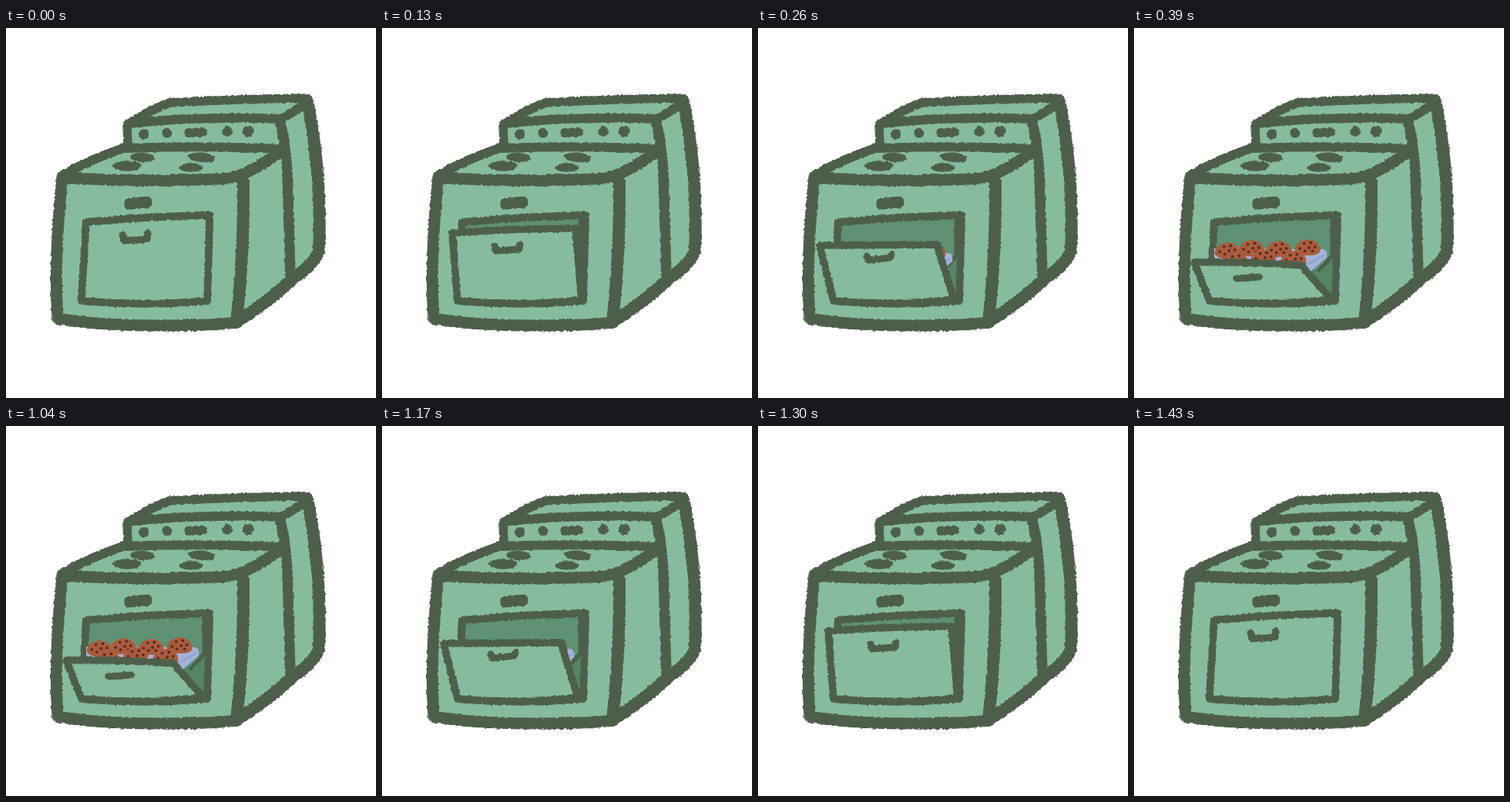
Write an HTML page that moves like this. It is 480 px wide and 480 px high and loops after 1.56 s.

```html
<!DOCTYPE html>
<html>
<head>
<meta charset="utf-8">
<style>
html, body { margin: 0; width: 100%; height: 100%; overflow: hidden; background: #fff; }
svg { display: block; width: 100vw; height: 100vh; }
.line { fill: none; stroke: #4d5f4a; stroke-linecap: round; stroke-linejoin: round; }
.dark { fill: #4d5f4a; }
.skin { fill: #87bba0; }
</style>
</head>
<body>
<svg viewBox="0 0 480 480">
  <filter id="rough" filterUnits="userSpaceOnUse" x="0" y="0" width="480" height="480" color-interpolation-filters="sRGB">
    <feTurbulence type="fractalNoise" baseFrequency=".25" numOctaves="2" seed="4"/>
    <feDisplacementMap in="SourceGraphic" scale="3.5" xChannelSelector="R" yChannelSelector="G"/>
  </filter>
  <defs>
    <g id="cookie">
      <path fill="#ab5c3d" d="M-15 4C-16-4-8-10 1-10S17-2 15 5Q10 10 1 9Q-9 11-15 4Z"/>
      <g id="chips" fill="#5a2d20"></g>
    </g>
  </defs>

  <g filter="url(#rough)">
    <path class="skin" d="M72 194L152 156L157 124L212 96L392 90Q405 140 406 190L408 285Q406 301 370 329L298 384Q180 390 66 378Z"/>
    <g class="line" stroke-width="15">
      <path d="M73 193Q62 300 67 376"/>
      <path d="M67 377Q120 386 200 386Q270 386 298 382"/>
      <path d="M308 200Q309 290 299 382" stroke-width="16"/>
      <path d="M299 381Q340 356 370 327Q404 303 406 287Q410 190 391 95" stroke-width="16"/>
      <path d="M74 194Q190 201 290 195Q315 190 357 160"/>
      <path d="M73 191Q110 170 152 156Q250 152 356 157" stroke-width="12"/>
      <path d="M158 150L157 126Q183 108 212 97Q300 92 391 91" stroke-width="11.5"/>
      <path d="M159 124Q250 114 356 118Q375 108 390 97" stroke-width="12"/>
      <path d="M355 120Q365 155 366 220L369 327" stroke-width="13.5"/>
    </g>
    <g class="dark">
      <circle cx="179" cy="138" r="6.7"/><circle cx="209" cy="136" r="6.5"/>
      <circle cx="287" cy="134" r="6.7"/><circle cx="314" cy="134" r="7.2"/>
      <rect x="231.500" y="129.500" width="29" height="12" rx="5" transform="rotate(-3 246 135)"/>
      <ellipse cx="177" cy="168" rx="15.500" ry="6.200" transform="rotate(4 177 168)"/>
      <ellipse cx="254" cy="168" rx="17.500" ry="6.500" transform="rotate(4 254 168)"/>
      <ellipse cx="157" cy="179" rx="18.500" ry="6.700"/>
      <ellipse cx="240" cy="181" rx="15.500" ry="5.700"/>
      <rect x="153.500" y="219.500" width="36" height="15" rx="6" transform="rotate(-5 171 227)"/>
    </g>
    <path fill="#5f9175" d="M104 252L265 243L262 354L97 354Z"/>
    <path fill="#548566" d="M258 294L240 313L200 312L260 352Z"/>
    <path class="line" stroke-width="5" d="M240 314L257 296V248"/>
    <path class="line" stroke-width="10" d="M104 252Q190 244 264 243L261 354Q180 361 98 354Z"/>
  </g>

  <g id="load">
    <path id="tray" fill="#a4b2db"/>
    <path id="rim" fill="none" stroke="#93a3d2" stroke-width="3" stroke-linecap="round"/>
    <g id="cookies"></g>
  </g>

  <g filter="url(#rough)">
    <path id="door" class="line" style="fill:#87bba0" stroke-width="9.500"/>
    <path id="ledge" class="line" stroke-width="8"/>
    <path id="handle" class="line" stroke-width="9"/>
  </g>
</svg>
<script>
const $ = id => document.getElementById(id);
const base = "Q180 361 98 354Z";

// door poses, from shut to fully open
const doors = [
  { door: "M104 252Q190 244 264 243L261 354" + base, handle: "M151 268L153 276L183 274L184 266" },
  { door: "M91 266Q170 260 251 260L259 353" + base, handle: "M146 283L148 289L178 287L179 281" },
  { door: "M80 282L232 281L254 352" + base, handle: "M141 296L143 301L171 298L173 294" },
  { door: "M78 304Q150 303 217 308L256 352" + base, handle: "M133 325L163 323" },
  { door: "M76 329Q130 324 192 327L255 354" + base, handle: "M125 342L151 342", ledge: "M84 319Q160 322 243 319" }
];

const loads = {
  inside: {
    tray: "M104 286L246 287Q252 290 250 298L230 315L104 309Z",
    rim: "M226 306L246 295",
    cookies: [[121, 289], [152, 286], [188, 287], [225, 285], [132, 302], [168, 298], [207, 300]],
    scale: 1.08
  },
  out: {
    tray: "M102 278L245 278Q252 280 251 285L245 313Q243 318 235 317L96 314Q90 313 91 307Z",
    rim: "M99 306L112 307M145 308L190 308M224 304L237 303",
    cookies: [[111, 284], [146, 285], [186, 283], [224, 283], [128, 295], [168, 297], [207, 297]],
    scale: 1
  }
};

// start time, door pose, load, load offset
const steps = [
  [0, 0, "inside", 0, 4],
  [130, 1, "inside", 0, 4],
  [260, 2, "inside", 2, 5],
  [390, 3, "inside", 0, 0],
  [520, 4, "out", 0, 0],
  [1040, 3, "inside", 0, 0],
  [1170, 2, "inside", -1, 2],
  [1300, 1, "inside", -1, 4],
  [1430, 0, "inside", 0, 4]
];

$("chips").innerHTML = [[-9, 1], [-4, -5], [4, -6], [9, -1], [2, 0], [-3, 4], [6, 4]]
  .map(([x, y]) => `<circle cx="${x}" cy="${y}" r="1.8"/>`).join("");

function show([, pose, place, dx, dy]) {
  const { door, handle, ledge = "" } = doors[pose];
  const { tray, rim, cookies, scale } = loads[place];
  const paths = { door, handle, ledge, tray, rim };
  for (const id in paths) $(id).setAttribute("d", paths[id]);
  $("load").setAttribute("transform", `translate(${dx} ${dy})`);
  $("load").setAttribute("visibility", pose > 1 ? "visible" : "hidden");
  $("cookies").innerHTML = cookies.map(([x, y]) =>
    `<use href="#cookie" transform="translate(${x} ${y}) scale(${scale})"/>`).join("");
}

let current;
function tick() {
  const t = performance.now() % 1560;
  const step = steps.findLast(s => s[0] <= t);
  if (step !== current) show(current = step);
  requestAnimationFrame(tick);
}
tick();
</script>
</body>
</html>
```
